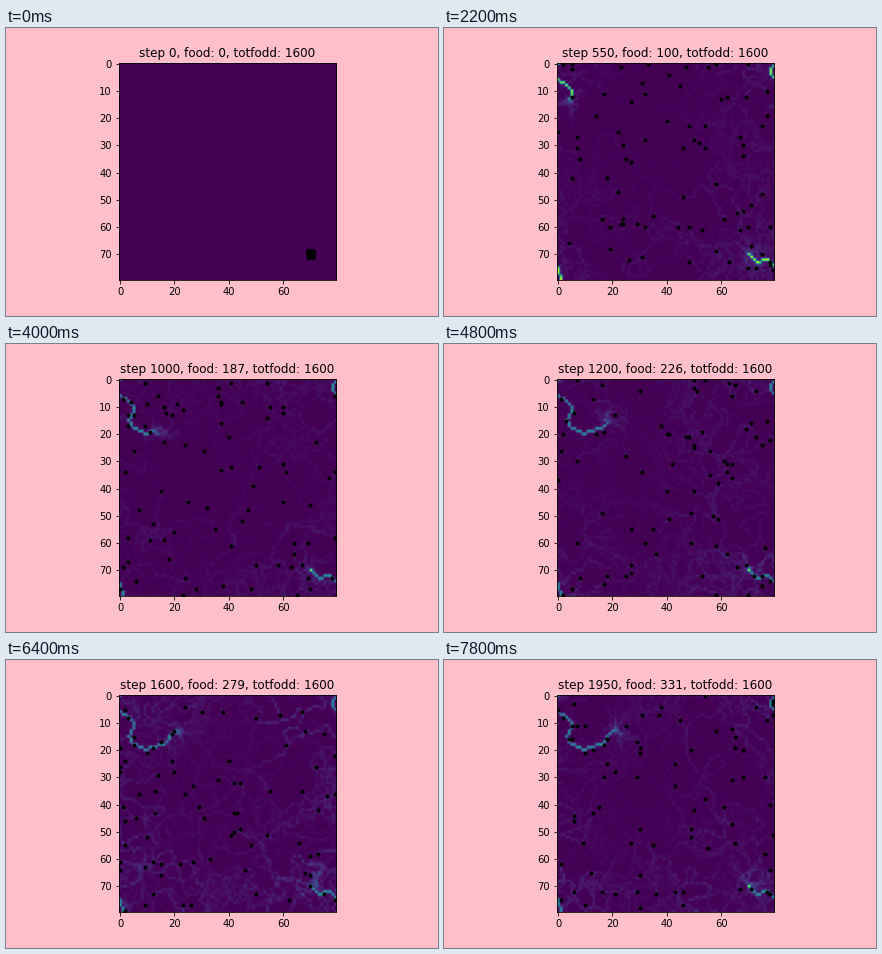
Animation, 432 px wide and 288 px high, one loop 8 s. Source, as a matplotlib script:

```python
import numpy as np
import matplotlib.pyplot as plt
from matplotlib.animation import FuncAnimation

SIZE, FRAMES, STRIDE = 80, 40, 50
ANTS, SCOUTS = 80, 26
NEST = (70, 70)

# Trail corners on the unwrapped torus, from the nest outwards
CORNERS = [(70, 70), (73, 73), (77, 72), (80, 75), (81, 79), (78, 82),
           (78, 84), (85, 90), (85, 92), (83, 95), (84, 97), (89, 100),
           (92, 99), (96, 98), (100, 93), (102, 93)]

# Food brought home, by step
FOOD = [(0, 0), (250, 30), (550, 100), (1000, 187),
        (1200, 226), (1600, 279), (1950, 331)]


def rasterise(corners):
    """Join the corners by lines of whole cells, wrapped onto the field."""
    pts = np.array(corners)
    cells = [pts[:1]]
    for a, b in zip(pts, pts[1:]):
        n = np.abs(b - a).max()
        t = np.arange(1, n + 1)[:, None] / n
        cells.append(np.round(a + (b - a) * t).astype(int))
    return np.concatenate(cells) % SIZE


def roam(rng, start, count, length, turn):
    """Wandering paths with slowly changing headings: length x count x 2."""
    angle = rng.uniform(0, 2 * np.pi, count)
    angle = angle + rng.normal(0, turn, (length, count)).cumsum(axis=0)
    moves = np.stack((np.cos(angle), np.sin(angle)), axis=2)
    moves[0] = rng.integers(-1, 2, (count, 2))
    return np.round(start + moves.cumsum(axis=0)).astype(int) % SIZE


def ease(t):
    t = np.clip(t, 0, 1)
    return t * t * (3 - 2 * t)


def food(step):
    return round(np.interp(step, *zip(*FOOD)))


def reach(step):
    """How far along the trail the scent goes: one half early, one half later."""
    half = (len(TRAIL) - 1) / 2
    return half * (min(1, step / 250) + ease((step - 250) / 1250))


def trail_level(step):
    return min(1, step / 300) * (.46 + .4 * np.exp(-((step - 550) / 200) ** 2))


def web_level(step):
    return .08 - .035 * np.cos(2 * np.pi * (step - 800) / 1600)


def scout_webs(paths, rng):
    """Fading scent of the scouts at the start of every frame."""
    web = np.zeros((SIZE, SIZE))
    webs = []
    for step, cells in enumerate(paths):
        x, y = cells[:SCOUTS].T
        web *= .988
        web[y, x] = np.maximum(web[y, x], rng.uniform(.3, 1, SCOUTS))
        if step % STRIDE == 0:
            webs.append(web.copy())
    webs[0][:] = 0
    return webs


def add_streaks(scent, rng, start, level, length):
    fade = np.linspace(1, .2, length)
    for cells, f in zip(roam(rng, start, 9, length, .6), fade):
        np.add.at(scent, (cells[:, 1], cells[:, 0]), level * f)


def scent_map(step, web, rng):
    scent = web * web_level(step) * NEARNESS
    if step == 0:
        return scent
    tip = reach(step)
    add_streaks(scent, rng, NEST, .8 * web_level(step), 16)
    add_streaks(scent, rng, TRAIL[int(tip)], .06, 10)
    scent = np.minimum(scent, .3)

    index = np.arange(len(TRAIL))
    level = trail_level(step) * np.clip((tip + 1 - index) / 3, 0, 1)
    level *= rng.uniform(.85, 1.15, len(TRAIL)) * (1 + .4 * np.exp(-index / 2))
    level[0] = .9
    x, y = TRAIL.T
    scent[y, x] = np.maximum(scent[y, x], level)
    return scent


def ant_cells(step, roaming, rng):
    """Free ants, with the last few shuttling between nest and food."""
    cells = roaming.copy()
    n = step // 150
    if n:
        tip = reach(step)
        phase = np.arange(n) * .618 + step / (2 * tip)
        place = tip * (1 - np.abs(2 * (phase % 1) - 1))
        cells[-n:] = (TRAIL[place.astype(int)] + rng.integers(0, 2, (n, 2))) % SIZE
    return cells


TRAIL = rasterise(CORNERS)
wave = np.cos(2 * np.pi * (np.arange(SIZE) - NEST[0]) / SIZE)
NEARNESS = .9 + .3 * (wave[:, None] + wave)   # scent is stronger around the nest
seed = np.random.default_rng(12)
PATHS = roam(seed, NEST, ANTS, FRAMES * STRIDE, .5)
WEBS = scout_webs(PATHS, seed)

plt.rcParams.update({"font.family": "DejaVu Sans", "font.size": 10})
fig = plt.figure(figsize=(6, 4), dpi=72, facecolor="pink")
fig.subplots_adjust(left=.125, right=.9, bottom=.125, top=.88)
ax = fig.add_subplot()
image = ax.imshow(np.zeros((SIZE, SIZE)), cmap="viridis", vmin=0, vmax=1)
dots, = ax.plot([], [], "k.")
title = ax.set_title("", fontsize=12)
ax.set(xlim=(-.5, SIZE - .5), ylim=(SIZE - .5, -.5),
       xticks=range(0, SIZE, 20), yticks=range(0, SIZE, 10))


def draw(frame):
    step = frame * STRIDE
    rng = np.random.default_rng(100 + frame)
    image.set_data(scent_map(step, WEBS[frame], rng))
    dots.set_data(*ant_cells(step, PATHS[step], rng).T)
    title.set_text(f"step {step}, food: {food(step)}, totfodd: 1600")
    return image, dots, title


anim = FuncAnimation(fig, draw, frames=FRAMES, interval=200,
                     init_func=lambda: draw(0), repeat=True, repeat_delay=0)
plt.show()
```
